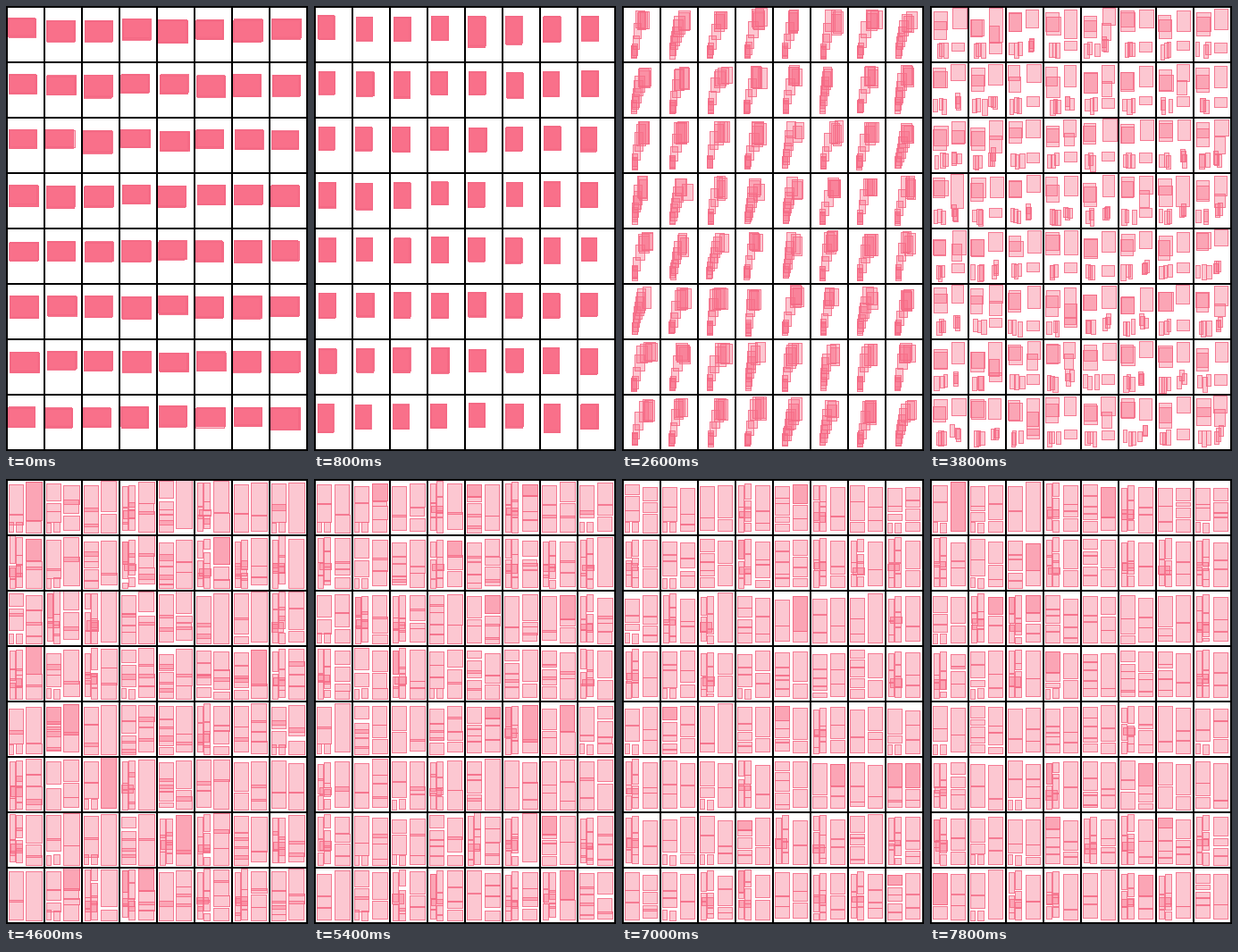
An HTML page with a canvas that plays this animation: 338x498 px, repeating every 8000 ms.

```html
<!DOCTYPE html>
<html>
<head>
<meta charset="utf-8">
<title>Layouts taking shape</title>
<style>
  html, body { margin: 0; width: 100%; height: 100%; overflow: hidden; background: #000; }
  canvas { display: block; width: 338px; height: 498px; }
</style>
</head>
<body>
<canvas id="stage" width="338" height="498"></canvas>
<script>
const ctx = document.getElementById('stage').getContext('2d');
const STEP_MS = 200, STEPS = 40;

// Left column of each cell: W few wide boxes, S many wide boxes,
// B wide boxes above a narrow pair, N two narrow stacks.
const STYLES = [
  'BBWNSNWB', 'NBSNSNNN', 'BNNSWWWN', 'NBNBSSSN',
  'BSWSSNWB', 'NWBNSWWW', 'NBBSNNSN', 'WBNNWNNS'
].join('');

function random(seed) {
  return () => {
    seed = (seed + 0x6D2B79F5) | 0;
    let t = Math.imul(seed ^ (seed >>> 15), 1 | seed);
    t = (t + Math.imul(t ^ (t >>> 7), 61 | t)) ^ t;
    return ((t ^ (t >>> 14)) >>> 0) / 4294967296;
  };
}

const range = (r, low, high) => low + r() * (high - low);
const times = (n, make) => Array.from({ length: n }, (_, i) => make(i));
const mix = (a, b, k) => a + (b - a) * k;
const clamp = v => Math.max(0, Math.min(1, v));
const smooth = v => v * v * (3 - 2 * v);

// Every state returns [left boxes, right boxes], a box being [x, y, w, h].
const halves = boxes => [boxes.slice(0, 6), boxes.slice(6)];

function block(r) {
  const x = range(r, 0, 2.5), y = range(r, 12, 14.5);
  const w = range(r, 29, 32), h = range(r, 19, 24);
  return halves(times(10, () =>
    [x + range(r, -.6, .6), y + range(r, -.8, .8), w + range(r, -.6, .6), h + range(r, -.8, .8)]));
}

function bar(r) {
  const spread = 2 * r() ** 2, y = range(r, 3.5, 5.5);
  const h = r() < .1 ? 44 : range(r, 30, 35);
  return halves(times(10, () =>
    [5 - r() * spread * .6, y + range(r, -1, 1) * spread, 2 + r() * spread * .5, h + range(r, -1, 1) * spread]));
}

function chain(r) {
  const steep = r() < .6, top = range(r, 1, 5), w = range(r, 9, 13), h = range(r, 18, 25);
  const left = range(r, 12, 16), fan = range(r, 5, 12), foot = range(r, 8, 10);
  return halves(times(10, i => {
    let p = smooth(i / 9);
    if (steep) p = smooth(smooth(p));
    const x = mix(foot, left, p) + (p > .75 ? r() * fan : 0);
    return [x, mix(42, top, p) + range(r, -1, 2), mix(6, w, p), mix(13, h, p)];
  }));
}

function early(r) {
  const upper = times(2, () => [range(r, 1, 2.5), range(r, 2, 15), range(r, 13, 16), range(r, 17, 23)]);
  const lower = times(3, i => [1 + i * 4 + range(r, 0, 5), range(r, 38, 41), range(r, 4, 6), range(r, 13, 18)]);
  const right = [[range(r, 21, 23), range(r, 0, 3), range(r, 13, 16), range(r, 18, r() < .3 ? 42 : 25)]];
  if (r() < .35) right.push([22, range(r, 12, 22), range(r, 10, 14), range(r, 14, 20)]);
  if (r() < .6) right.push([22, range(r, 36, 40), 14, range(r, 9, 12)]);
  else right.push(...times(3, () => [range(r, 20, 28), range(r, 32, 40), 5, range(r, 11, 15)]));
  return [[...upper, ...lower], right];
}

function stack(r, x, w, top, bottom, count, mess) {
  const weights = times(count, i => range(r, .4, 1.5) + (i ? 0 : .6));
  const unit = (bottom - top) / weights.reduce((a, b) => a + b);
  let y = top;
  return weights.map(weight => {
    const h = weight * unit;
    const box = [x, y + range(r, -.4, .4) * mess, w + range(r, -.5, .5), h - 2 + r() * mess];
    y += h;
    box[3] = Math.min(box[3], 58 - box[1]);
    return box;
  });
}

function columns(r, style, step) {
  const order = clamp((step - 23) / 8), mess = mix(6, 2.2, order);
  const top = mix(2, 4, order) + range(r, -1, 4);
  const wide = (bottom, count) => stack(r, 1, 16, top, bottom, count, mess);
  let left;
  if (style === 'W') left = wide(57, r() < .5 ? 2 : 3);
  else if (style === 'S') left = wide(57, 5);
  else if (style === 'B') left = [
    ...wide(45, r() < .4 ? 3 : 2),
    [1, 46 + r(), 5, 11], [9, 46 + r(), 7, 11]
  ];
  else left = [
    ...stack(r, 1.5, 6, top, 57, 3, mess),
    ...stack(r, 9, 7, top - 2, 57, 4, mess),
    [range(r, 1, 4), range(r, 28, 36), 13, range(r, 6, 12)]
  ];
  const pick = r(), count = pick < .12 ? 1 : pick < .4 ? 2 : pick < .75 ? 3 : 4;
  const rightTop = count === 1 ? 1 : mix(0, 4, order) + range(r, 0, 4);
  const right = stack(r, mix(20, 21, order), mix(17.5, 16, order), rightTop, 57, count, mess);
  if (r() < .12) right.push([...right[0]]);
  if (r() < .12) left.push([...left[0]]);
  return [left, right];
}

const KEYS = [[0, block], [9, bar], [13, chain], [19, early], [23, columns]];

function layout(cell, step) {
  const state = (at, make) => make(random(cell * 7919 + at * 104729), STYLES[cell], at);
  if (step >= 23) return state(step, columns).flat();
  const next = Math.max(1, KEYS.findIndex(([at]) => step <= at));
  const [start, before] = KEYS[next - 1], [end, after] = KEYS[next];
  const from = state(start, before), to = state(end, after);
  const k = (step - start) / (end - start);
  return to.flatMap((side, s) => side.map((box, i) =>
    box.map((v, j) => mix(from[s][i % from[s].length][j], v, k))));
}

function drawCell(cell, step) {
  ctx.save();
  ctx.translate(2 + cell % 8 * 42, 2 + Math.floor(cell / 8) * 62);
  ctx.beginPath();
  ctx.rect(0, 0, 40, 60);
  ctx.clip();
  ctx.fillStyle = '#fff';
  ctx.fillRect(0, 0, 40, 60);
  ctx.fillStyle = 'rgba(248, 112, 138, .39)';
  ctx.strokeStyle = 'rgba(244, 104, 132, .8)';
  for (const box of layout(cell, step)) {
    const [x, y, w, h] = box.map(Math.round);
    ctx.fillRect(x, y, w + 1, h + 1);
    ctx.strokeRect(x + .5, y + .5, w, h);
  }
  ctx.restore();
}

let shown = -1;
function frame() {
  const step = Math.floor(performance.now() / STEP_MS) % STEPS;
  if (step !== shown) {
    shown = step;
    ctx.fillStyle = '#000';
    ctx.fillRect(0, 0, 338, 498);
    for (let cell = 0; cell < 64; cell++) drawCell(cell, step);
  }
  requestAnimationFrame(frame);
}
frame();
</script>
</body>
</html>
```
